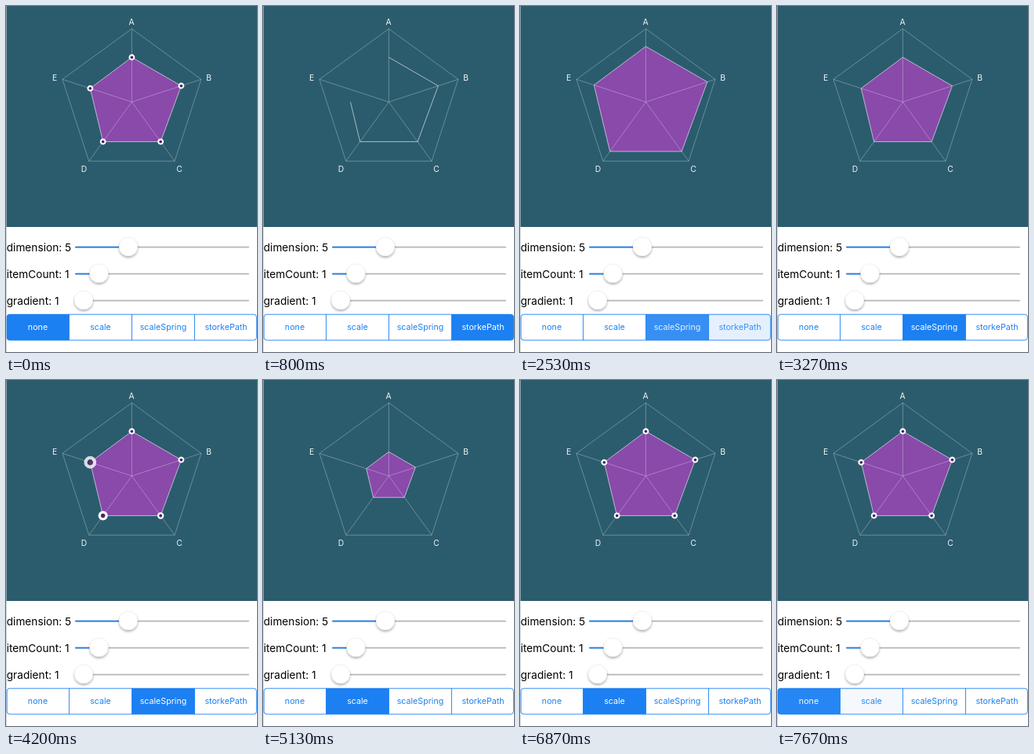
Recreate the animation shown at these times as an HTML page. Size 320 by 440 pixels, loop 7740 ms.

```html
<!DOCTYPE html>
<html lang="en">
<head>
<meta charset="utf-8">
<title>Radar chart animations</title>
<style>
  html, body { margin: 0; width: 100%; height: 100%; overflow: hidden; background: #fff; }
  svg { display: block; width: 320px; height: 440px; font-family: Inter, Roboto, sans-serif; }
</style>
</head>
<body>
<svg id="stage" viewBox="0 0 320 440">
  <defs>
    <filter id="shadow" x="-40%" y="-40%" width="180%" height="190%">
      <feDropShadow dx="0" dy="2" stdDeviation="1.8" flood-color="#000" flood-opacity=".3"/>
    </filter>
    <clipPath id="rounded"><rect x="1" y="392" width="318.5" height="33" rx="3.5"/></clipPath>
  </defs>
  <rect width="320" height="440" fill="#fff"/>
  <rect width="320" height="281" fill="#2b5c6d"/>
  <rect width="1" height="440" fill="#b9c2c6" opacity=".7"/>
</svg>
<script>
const LOOP = 7740;
const BLUE = [28, 128, 242];
const CENTER = { x: 160.4, y: 122 };
const RADIUS = 93;
const VALUES = [0.61, 0.712, 0.672, 0.672, 0.6];
const STAGGER = 130;
const stage = document.getElementById('stage');

// Each tap selects a segment; dots start popping once the shape has settled.
const MODES = [
  { name: 'none', tap: 7480 },
  { name: 'storkePath', tap: 150, dots: 1120 },
  { name: 'scaleSpring', tap: 2355, dots: 3460 },
  { name: 'scale', tap: 4620, dots: 5765 }
];

function add(parent, tag, attrs, text) {
  const node = document.createElementNS('http://www.w3.org/2000/svg', tag);
  set(node, attrs);
  if (text) node.textContent = text;
  parent.appendChild(node);
  return node;
}
function set(node, attrs) {
  for (const key in attrs) node.setAttribute(key, attrs[key]);
}
const clamp = v => Math.max(0, Math.min(1, v));
const easeInOut = v => { v = clamp(v); return v * v * (3 - 2 * v); };
const rgb = (from, to, k) =>
  `rgb(${from.map((c, i) => Math.round(c + (to[i] - c) * k)).join()})`;

function vertex(i, r) {
  const a = i * Math.PI * 2 / 5 - Math.PI / 2;
  return [CENTER.x + r * Math.cos(a), CENTER.y + r * Math.sin(a)];
}
const outline = scale =>
  'M' + VALUES.map((v, i) => vertex(i, v * RADIUS * scale).map(n => n.toFixed(2))).join('L') + 'Z';

// Chart
const fill = add(stage, 'path', { fill: '#894aaa' });
const web = add(stage, 'g', { fill: 'none', stroke: '#fff', 'stroke-width': 0.7, 'stroke-opacity': 0.42 });
const corners = VALUES.map((_, i) => vertex(i, RADIUS));
add(web, 'path', { d: 'M' + corners.join('L') + 'Z' });
corners.forEach(p => add(web, 'path', { d: `M${CENTER.x} ${CENTER.y}L${p}` }));
const edge = add(stage, 'path', {
  fill: 'none', stroke: '#fff', 'stroke-opacity': 0.65, 'stroke-width': 0.9, pathLength: 1
});
const dots = VALUES.map((v, i) => {
  const [x, y] = vertex(i, v * RADIUS);
  const node = add(stage, 'g', {});
  add(node, 'circle', { r: 2.9, fill: '#4b2464', stroke: '#fff', 'stroke-width': 2.1 });
  return { node, x, y };
});
[['A', 160, 24], ['B', 258.5, 95], ['C', 221, 211], ['D', 99.5, 211], ['E', 62, 95]]
  .forEach(([s, x, y]) => add(stage, 'text',
    { x, y, fill: '#f1f5f6', 'font-size': 10.3, 'text-anchor': 'middle' }, s));

// Sliders
[['dimension: 5', 306.5, 156], ['itemCount: 1', 340.5, 118.5], ['gradient: 1', 374.5, 99]]
  .forEach(([label, y, x]) => {
    add(stage, 'text', { x: 0.7, y: y + 5, 'font-size': 13.7, fill: '#000' }, label);
    add(stage, 'rect', { x: 88, y: y - 0.8, width: 222, height: 1.8, rx: 0.9, fill: '#b6b6b6' });
    if (x > 100) add(stage, 'rect', { x: 88, y: y - 0.8, width: x - 88, height: 1.8, rx: 0.9, fill: rgb(BLUE, BLUE, 0) });
    add(stage, 'circle', { cx: x, cy: y - 0.5, r: 12, fill: '#fff', stroke: '#000', 'stroke-opacity': 0.1, 'stroke-width': 0.5, filter: 'url(#shadow)' });
  });

// Segmented control
const bar = add(stage, 'g', { 'clip-path': 'url(#rounded)' });
const segments = ['none', 'scale', 'scaleSpring', 'storkePath'].map((name, i) => ({
  name,
  back: add(bar, 'rect', { x: 0.5 + i * 80, y: 392, width: 80, height: 33 }),
  text: add(stage, 'text', { x: 40.5 + i * 80, y: 412.3, 'font-size': 10.7, 'text-anchor': 'middle' }, name)
}));
add(stage, 'path', {
  d: 'M80.5 392V425M160.5 392V425M240.5 392V425', stroke: rgb(BLUE, BLUE, 0), 'stroke-width': 0.9
});
add(stage, 'rect', {
  x: 1.2, y: 392.2, width: 318.2, height: 32.8, rx: 3.5,
  fill: 'none', stroke: rgb(BLUE, BLUE, 0), 'stroke-width': 0.9
});

function shapeScale(mode, age) {
  if (mode.name === 'scale') return easeInOut(age / 970);
  if (mode.name === 'scaleSpring') {
    const s = age / 1000, w = Math.PI / 0.18, decay = 7.8;
    return 1 - Math.exp(-decay * s) * (Math.cos(w * s) + decay / w * Math.sin(w * s));
  }
  return 1;
}
function popScale(age) {
  return age < 220 ? 2 * clamp(age / 220) : 2 - clamp((age - 220) / 280);
}

function render(t) {
  let index = 0;
  for (let i = 1; i < MODES.length; i++) if (t >= MODES[i].tap) index = i;
  if (t >= MODES[0].tap) index = 0;
  const mode = MODES[index];
  const previous = MODES[(index + 3) % 4];
  const age = (t - mode.tap + LOOP) % LOOP;

  const drawing = mode.name === 'storkePath';
  const d = outline(shapeScale(mode, age));
  set(fill, { d, opacity: drawing ? clamp((t - 2100) / 200) : 1 });
  set(edge, {
    d,
    'stroke-dasharray': drawing && age < 950 ? `${easeInOut(age / 950)} 2` : 'none'
  });

  dots.forEach(({ node, x, y }, i) => {
    const dotAge = mode.dots ? t - mode.dots - i * STAGGER : 1000;
    set(node, {
      transform: `translate(${x} ${y}) scale(${popScale(dotAge)})`,
      opacity: dotAge > 0 ? clamp(0.4 + dotAge * 0.0018) : 0
    });
  });

  const fade = clamp(age / 200);
  segments.forEach(({ name, back, text }) => {
    const on = name === mode.name ? fade : name === previous.name ? 1 - fade : 0;
    set(back, { fill: rgb([255, 255, 255], BLUE, on) });
    set(text, { fill: rgb(BLUE, [255, 255, 255], on) });
  });
}

const start = performance.now();
function tick() {
  render((performance.now() - start) % LOOP);
  requestAnimationFrame(tick);
}
tick();
</script>
</body>
</html>
```
